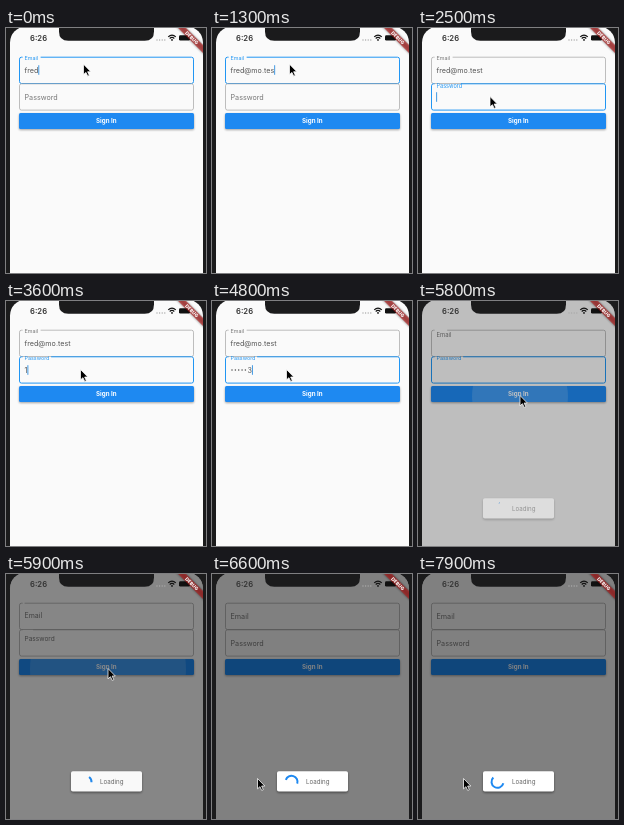
An HTML page for the animation above (8000 ms loop, 200 px wide and 245 px high).

```html
<!DOCTYPE html>
<html lang="en">
<head>
<meta charset="utf-8">
<title>Sign in form</title>
<style>
  html, body { margin: 0; width: 100%; height: 100%; overflow: hidden; background: #1b1b1c; }
  svg { display: block; width: 100vw; height: 100vh; font-family: Inter, "Liberation Sans", sans-serif; }
  .border { fill: none; }
  .value { font-size: 7.2px; fill: #555; }
  .label { font-size: 7.2px; }
  .bold { font-weight: 700; }
</style>
</head>
<body>
<svg viewBox="0 0 200 245">
  <defs>
    <rect id="screen" x="4" y="-1.4" width="193" height="280" rx="16"/>
    <clipPath id="screenClip"><use href="#screen"/></clipPath>
    <clipPath id="buttonClip"><rect x="13" y="85" width="175" height="16" rx="1.5"/></clipPath>
    <filter id="soft" x="-30%" y="-60%" width="160%" height="220%"><feGaussianBlur stdDeviation="1.3"/></filter>
  </defs>

  <use href="#screen" fill="#fafafa"/>

  <path id="emailBorder" class="border"/>
  <text id="emailLabel" class="label">Email</text>
  <text id="emailText" class="value" x="18.5" y="44.6"></text>

  <path id="passBorder" class="border"/>
  <text id="passLabel" class="label">Password</text>
  <g id="dots" fill="#4c4c4c"></g>
  <text id="passText" class="value" y="71.6"></text>

  <rect id="caret" width=".9" height="9.6" fill="#2f8fe0"/>

  <rect x="13" y="86" width="175" height="16" rx="1.5" opacity=".35" filter="url(#soft)"/>
  <g clip-path="url(#buttonClip)">
    <rect x="13" y="85" width="175" height="16" fill="#1e89f1"/>
    <circle id="ripple" cx="102" cy="95" r="0" fill="#fff"/>
  </g>
  <text class="bold" x="100.3" y="95.3" font-size="6.2" fill="#fff" text-anchor="middle">Sign In</text>

  <use id="shade" href="#screen" fill="#000" opacity="0"/>

  <g id="dialog">
    <rect x="65" y="198.2" width="71" height="20.5" rx="2" opacity=".45" filter="url(#soft)"/>
    <rect x="65" y="197.2" width="71" height="20.4" rx="1.8" fill="#fff"/>
    <path id="spinner" fill="none" stroke="#1e89f1" stroke-width="2"/>
    <text x="94" y="210" font-size="6.2" fill="#666">Loading</text>
  </g>

  <path d="M53 0V3.4Q53 12.7 62.3 12.7H138.7Q148 12.7 148 3.4V0Z" fill="#1b1b1c"/>
  <text x="24" y="12.7" font-size="7.7" font-weight="600" fill="#333">6:26</text>
  <path d="M151 12H159" stroke="#aaa" stroke-width="1.4" stroke-linecap="round" stroke-dasharray="0 2.6"/>
  <g fill="none" stroke="#111" stroke-width="1.2">
    <path d="M162.2 8.9Q166 5.5 169.8 8.9"/>
    <path d="M163.7 10.5Q166 8.4 168.3 10.5"/>
  </g>
  <circle cx="166" cy="11.9" r=".9" fill="#111"/>
  <rect x="173" y="7.2" width="11" height="5.4" rx="1.4" fill="#111"/>

  <g clip-path="url(#screenClip)">
    <g transform="translate(197 -1.4) rotate(45)">
      <rect x="-26" y="13" width="52" height="5.6" opacity=".5" filter="url(#soft)"/>
      <rect x="-26" y="13" width="52" height="5.6" fill="#b71c1c" fill-opacity=".63"/>
      <text x="0" y="17.5" font-size="4.7" font-weight="800" fill="#fff" text-anchor="middle">DEBUG</text>
    </g>
  </g>

  <path id="mouse" d="M0 0V11L2.6 8.7L4.5 12.7L6.2 11.9L4.4 8H7.8Z" stroke="#fff" stroke-width=".8"/>
</svg>
<script>
const LOOP = 8000, STEP = 100;
const EMAIL = "fred@mo.test", PASS = "123123";
const BLUE = "#2196f3", GREY = "#a9a9a9", INK = "#777";
const FOCUS = 2300, SUBMIT = 5700;
const $ = id => document.getElementById(id);
const set = (id, attrs) => { for (const k in attrs) $(id).setAttribute(k, attrs[k]); };
const clamp = (x, lo, hi) => Math.min(hi, Math.max(lo, x));
const mix = (a, b, p) => a + (b - a) * p;

const ramp = (t, start, length) => clamp((t - start) / length, 0, 1);
const glide = (t, start, length) => ease(ramp(t, start, length));

// cubic-bezier(.4, 0, .2, 1), solved by bisection
function ease(x) {
  if (x <= 0 || x >= 1) return clamp(x, 0, 1);
  let lo = 0, hi = 1;
  for (let i = 0; i < 16; i++) {
    const m = (lo + hi) / 2, n = 1 - m;
    if (1.2 * m * n * n + .6 * m * m * n + m ** 3 < x) lo = m; else hi = m;
  }
  return 3 * lo * lo * (1 - lo) + lo ** 3;
}

// Outlined input whose label floats into a gap in the top edge
function field(name, top, floated, labelWidth, focused) {
  const left = 13.5, right = 187.5, bottom = top + 26.3, r = 2;
  const gapFrom = floated ? 16.6 : left + r;
  const gapTo = gapFrom + labelWidth * floated;
  set(name + "Border", {
    d: `M${gapTo} ${top}H${right - r}q${r} 0 ${r} ${r}V${bottom - r}q0 ${r} ${-r} ${r}` +
       `H${left + r}q${-r} 0 ${-r} ${-r}V${top + r}q0 ${-r} ${r} ${-r}H${gapFrom}`,
    stroke: focused ? BLUE : GREY,
    "stroke-width": focused ? 1 : .75
  });
  set(name + "Label", {
    transform: `translate(18.5 ${top + mix(15.9, 3, floated)}) scale(${mix(1, .75, floated)})`,
    fill: focused ? BLUE : INK
  });
}

// Indeterminate ring: the head runs ahead, then the tail catches up
function spin(t) {
  const cycle = Math.max(0, t - 5740) / 1333, turn = Math.floor(cycle), f = cycle - turn;
  const head = ease(f * 2), tail = ease(f * 2 - 1);
  const from = Math.PI * (-.5 + 1.5 * tail + 1.7 * f - .8 * turn);
  const sweep = Math.max(.02, 1.5 * Math.PI * (head - tail));
  const point = a => `${79.5 + 6 * Math.cos(a)} ${207.8 + 6 * Math.sin(a)}`;
  set("spinner", { d: `M${point(from)}A6 6 0 ${sweep > Math.PI ? 1 : 0} 1 ${point(from + sweep)}` });
}

function emailLength(t) {
  if (t < 100) return 4;
  if (t < 600) return 5;
  if (t < 900) return 7;
  return Math.min(EMAIL.length, 8 + Math.floor((t - 900) / 133));
}
const passLength = t => clamp(1 + Math.floor((t - 3500) / 140), 0, PASS.length);

// Start, length and end point of each pointer move
const MOVES = [[1700, 500, 72, 68.5], [2900, 300, 74.5, 68.5], [4800, 600, 102, 94.5], [6000, 500, 45.5, 204.5]];
function pointer(t) {
  let x = 77.5, y = 36.2;
  for (const [start, length, toX, toY] of MOVES) {
    const p = glide(t, start, length);
    x = mix(x, toX, p);
    y = mix(y, toY, p);
  }
  set("mouse", { transform: `translate(${x} ${y}) scale(.94)` });
}

[...PASS].forEach((_, i) => {
  const dot = document.createElementNS("http://www.w3.org/2000/svg", "circle");
  dot.setAttribute("cx", 20 + 3.35 * i);
  dot.setAttribute("cy", 69);
  dot.setAttribute("r", .75);
  $("dots").append(dot);
});

function draw(t) {
  const sent = t >= SUBMIT, onPass = t >= FOCUS;

  field("email", 29.2, 1 - glide(t, SUBMIT + 20, 290), 18, !onPass);
  field("pass", 55.8, glide(t, FOCUS, 300) - glide(t, SUBMIT + 110, 220), 28.5, onPass && t < SUBMIT + 200);

  $("emailText").textContent = sent ? "" : EMAIL.slice(0, emailLength(t));

  // Only the newest password character stays readable
  const n = sent ? 0 : passLength(t), lastX = 18.5 + 3.4 * (n - 1);
  [...$("dots").children].forEach((d, i) => d.setAttribute("opacity", i < n - 1 ? 1 : 0));
  $("passText").textContent = n ? PASS[n - 1] : "";
  set("passText", { x: lastX });

  const emailEnd = 18.5 + $("emailText").getComputedTextLength();
  const passEnd = n ? lastX + $("passText").getComputedTextLength() : 18.2;
  set("caret", { x: onPass ? passEnd : emailEnd, y: onPass ? 64.2 : 37.2, opacity: sent ? 0 : 1 });

  set("ripple", { r: 90 * ramp(t, SUBMIT - 60, 300), opacity: .15 * (1 - ramp(t, SUBMIT + 200, 300)) });
  const shown = glide(t, SUBMIT + 12, 255);
  set("shade", { opacity: .49 * shown });
  set("dialog", { opacity: shown });
  spin(t);
  pointer(t);
}

// The picture advances ten times a second
function tick() {
  draw(Math.floor(performance.now() % LOOP / STEP) * STEP);
  requestAnimationFrame(tick);
}
tick();
</script>
</body>
</html>
```
